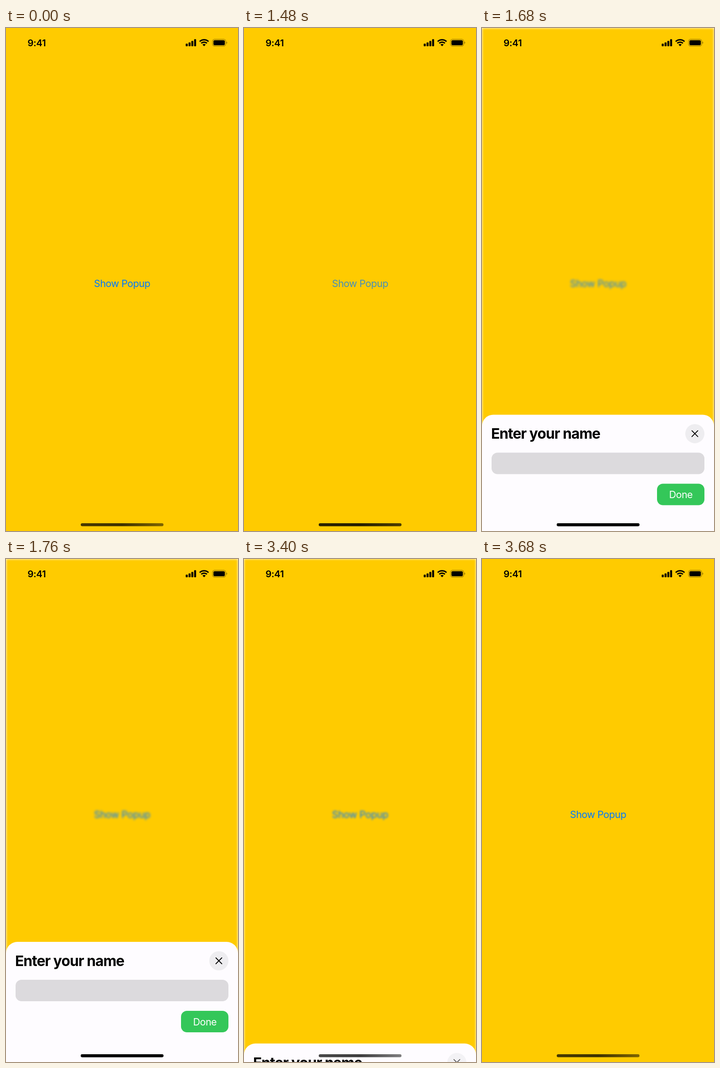
These frames come from a looping animation (509 px wide and 1101 px high, 3720 ms). An HTML page:

```html
<!DOCTYPE html>
<html lang="en">
<head>
<meta charset="utf-8">
<title>Bottom popup</title>
<style>
  html, body { margin: 0; width: 100%; height: 100%; overflow: hidden; background: #fff; }
  svg { display: block; width: 509px; height: 1101px; }
  text { font-family: Inter, "Liberation Sans", sans-serif; font-optical-sizing: none; }
  .label { font-size: 21.5px; letter-spacing: -.5px; }
  .title { font-size: 31.7px; font-weight: 700; letter-spacing: -.95px; }
  .clock { font-size: 20.6px; font-weight: 600; letter-spacing: -.4px; }
</style>
</head>
<body>
<svg viewBox="0 0 509 1101">
  <defs>
    <linearGradient id="fade">
      <stop offset="0" stop-opacity=".72"/>
      <stop offset=".5" stop-opacity=".76"/>
      <stop offset="1" stop-opacity=".5"/>
    </linearGradient>
  </defs>

  <g id="page">
    <rect width="509" height="1101" fill="#ffcb00"/>
    <text id="show" class="label" x="254.7" y="567" text-anchor="middle" fill="#007aff">Show Popup</text>
  </g>

  <g id="sheet">
    <rect width="509" height="400" rx="25" fill="#fefcff"/>
    <text class="title" x="20" y="53">Enter your name</text>
    <g id="close">
      <circle cx="467" cy="41.5" r="21" fill="#eeedf0"/>
      <path d="M460.5 35l13 13m0-13l-13 13" stroke="#000" stroke-width="1.8" stroke-linecap="round"/>
    </g>
    <rect x="21" y="83" width="467" height="47" rx="13" fill="#dcdadd"/>
    <rect x="384" y="151" width="104" height="47" rx="13" fill="#34c759"/>
    <text class="label" x="436.3" y="182.5" text-anchor="middle" fill="#fff">Done</text>
  </g>

  <!-- status bar -->
  <text class="clock" x="47.3" y="39.7">9:41</text>
  <g id="bars">
    <rect x="394.3" y="34.3" width="4.4" height="5.7" rx="1.3"/>
    <rect x="400.5" y="31.6" width="4.4" height="8.4" rx="1.3"/>
    <rect x="406.6" y="28.3" width="4.4" height="11.7" rx="1.3"/>
    <rect x="412.7" y="24.5" width="4.4" height="15.5" rx="1.3"/>
  </g>
  <g transform="translate(434.6 40)">
    <path d="M-9.7-10.4A14.2 14.2 0 0 1 9.7-10.4M-6.2-6.6A9 9 0 0 1 6.2-6.6" fill="none" stroke="#000" stroke-width="3"/>
    <path d="M0 0L-3.5-3.7A5.1 5.1 0 0 1 3.5-3.7Z"/>
  </g>
  <rect x="453.1" y="24.7" width="29" height="15" rx="4.6" fill="none" stroke="#000" stroke-width="1.2" opacity=".4"/>
  <rect x="455.1" y="26.7" width="25" height="11" rx="2.8"/>
  <path d="M483.7 29.6q3.2 2.6 0 5.2z" opacity=".45"/>

  <!-- home indicator -->
  <rect x="164" y="1084" width="181.5" height="6.6" rx="3.3" fill="url(#fade)"/>
  <rect id="home" x="164" y="1084" width="181.5" height="6.6" rx="3.3"/>
</svg>
<script>
const LOOP = 3720, STEP = 40, SLIDE = 350, OPEN = 1352, CLOSE = 3291;
const TOP = 838, TRAVEL = 1101, BLUR = 2.8;
const [page, show, sheet, close, home] =
  ["page", "show", "sheet", "close", "home"].map(id => document.getElementById(id));

const clamp = v => Math.min(1, Math.max(0, v));

// Ease-in-out: cubic-bezier(.42, 0, .58, 1)
function ease(x) {
  let lo = 0, hi = 1;
  for (let i = 0; i < 24; i++) {
    const s = (lo + hi) / 2, r = 1 - s;
    if (1.26 * s * r * r + 1.74 * s * s * r + s * s * s < x) lo = s; else hi = s;
  }
  return lo * lo * (3 - 2 * lo);
}

// Linear interpolation through [time, value] points
function track(t, points) {
  let [t0, v0] = points[0];
  for (const [t1, v1] of points) {
    if (t < t1) return t1 > t0 ? v0 + (v1 - v0) * (t - t0) / (t1 - t0) : v0;
    [t0, v0] = [t1, v1];
  }
  return v0;
}

function draw(t) {
  const shown = ease(clamp((t - OPEN) / SLIDE)) - ease(clamp((t - CLOSE) / SLIDE));
  const blur = shown * BLUR;
  page.style.filter = blur > .02 ? `blur(${blur}px)` : "none";
  sheet.setAttribute("transform", `translate(0 ${TOP + TRAVEL * (1 - shown)})`);
  show.setAttribute("opacity", track(t, [[1280, 1], [1320, .88], [1440, .7], [1600, .8], [1760, 1]]));
  close.setAttribute("opacity", track(t, [[3200, 1], [3240, .85], [3400, .65]]));
  home.setAttribute("opacity", track(t, [[1400, 0], [1600, 1], [3240, 1], [3400, 0]]));
}

const start = performance.now();
function tick() {
  const t = (performance.now() - start) % LOOP;
  draw(Math.floor(t / STEP) * STEP);
  requestAnimationFrame(tick);
}
tick();
</script>
</body>
</html>
```
